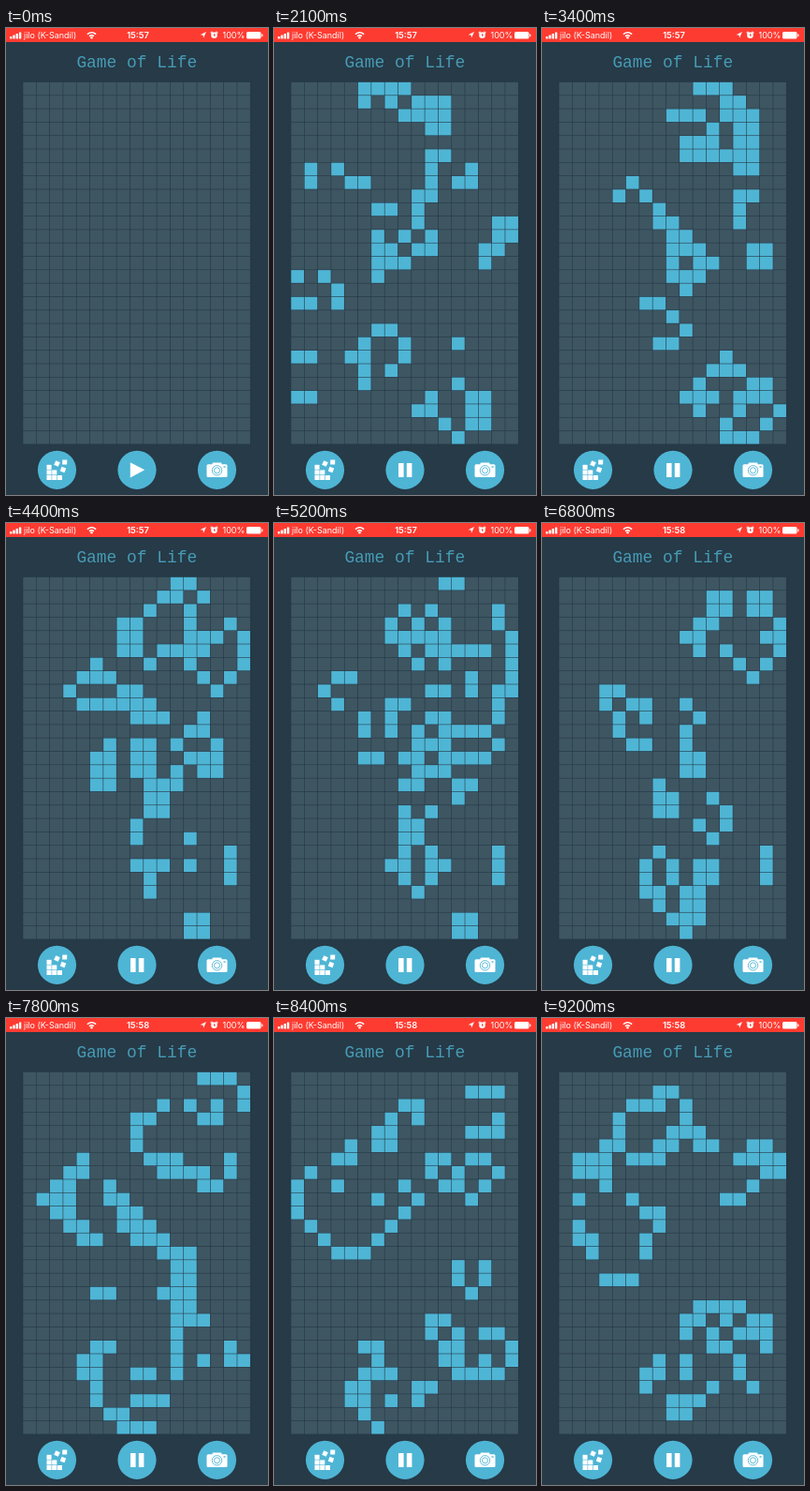
An HTML page with a canvas for the animation above (9300 ms loop, 280 by 498 pixels).

```html
<!DOCTYPE html>
<html lang="en">
<head>
<meta charset="utf-8">
<title>Game of Life</title>
<style>
html, body { margin: 0; width: 280px; height: 498px; overflow: hidden; background: #263a47; }
canvas { display: block; }
</style>
</head>
<body>
<canvas id="stage" width="280" height="498"></canvas>
<script>
const ctx = document.getElementById('stage').getContext('2d');
const LOOP = 9300, STEP = 200, COLS = 17, ROWS = 27;
const LEFT = 18, TOP = 57.5, PITCH = 14.31, GAP = 0.6;
const BACK = '#263a47', BLUE = '#4fb5d5', RED = '#fe3b31', WHITE = '#fff';

const makeGrid = alive => Array.from({ length: ROWS }, (_, r) =>
  Array.from({ length: COLS }, (_, c) => alive(r, c) ? 1 : 0));

// Cells beyond the border count as dead
function evolve(grid) {
  return makeGrid((r, c) => {
    let sum = 0;
    for (let y = r - 1; y <= r + 1; y++)
      for (let x = c - 1; x <= c + 1; x++) sum += grid[y]?.[x] || 0;
    return sum === 3 || (sum === 4 && grid[r][c]);
  });
}

// Brings cells to life along a walk of compass steps
function walk(grid, c, r, steps = '') {
  grid[r][c] = 1;
  for (const step of steps.split(' ')) {
    c += step.includes('E') - step.includes('W');
    r += step.includes('S') - step.includes('N');
    grid[r][c] = 1;
  }
}

function makeStart() {
  const grid = makeGrid(() => false);
  const add = (...args) => walk(grid, ...args);
  add(5, 1, 'N E E E SW SE NE E E S S W N W');
  add(11, 5, 'W S S S W S S SE S W NW SW SE W SW N N N');
  add(15, 10, 'E S SW SW N NE');
  add(7, 21, 'NE N NW W SW SW E S S');
  add(12, 22, 'SE E S S NW S SW NW NW W NE');
  add(1, 6, 'S');
  add(3, 6, 'SE E');
  add(13, 6, 'S W');
  add(6, 9, 'E');
  add(2, 14, 'SE S');
  add(0, 14);
  add(12, 19);
  for (const r of [16, 20, 23]) add(0, r, 'E');
  return grid;
}

let seed = 7;
const random = () => (seed = seed * 16807 % 2147483647) / 2147483647;
const empty = makeGrid(() => false);
const soup = makeGrid(() => random() < 0.2);
const generations = [makeStart()];
for (let t = 2200; t < LOOP; t += STEP) generations.push(evolve(generations.at(-1)));

function gridAt(t) {
  if (t < 1100) return empty;
  if (t < 2100) return soup;
  return generations[Math.floor((t - 2000) / STEP)];
}

function rect(x, y, w, h, color) {
  ctx.fillStyle = color;
  ctx.fillRect(x, y, w, h);
}

function box(x, y, w, h, radius, color) {
  ctx.fillStyle = color;
  ctx.beginPath();
  ctx.roundRect(x, y, w, h, radius);
  ctx.fill();
}

function disc(x, y, radius, color) {
  ctx.fillStyle = color;
  ctx.beginPath();
  ctx.arc(x, y, radius, 0, 7);
  ctx.fill();
}

function ring(x, y, radius, width, color, from = 0, to = 7) {
  ctx.strokeStyle = color;
  ctx.lineWidth = width;
  ctx.beginPath();
  ctx.arc(x, y, radius, from, to);
  ctx.stroke();
}

function poly(points, color) {
  ctx.fillStyle = color;
  ctx.beginPath();
  points.forEach(([x, y]) => ctx.lineTo(x, y));
  ctx.fill();
}

function text(str, x, y, font, color, align = 'left') {
  ctx.font = font;
  ctx.fillStyle = color;
  ctx.textAlign = align;
  ctx.fillText(str, x, y);
}

function tilted(x, y, size, angle) {
  ctx.save();
  ctx.translate(x, y);
  ctx.rotate(angle);
  rect(-size / 2, -size / 2, size, size, WHITE);
  ctx.restore();
}

function drawStatus(t) {
  const sans = 'Inter, sans-serif';
  rect(0, 0, 280, 15, RED);
  for (let i = 0; i < 4; i++) box(4 + i * 3.3, 9 - i * 1.5, 2.4, 2.5 + i * 1.5, 0.5, WHITE);
  text('jilo (K-Sandil)', 19, 11, '9px ' + sans, WHITE);
  for (const radius of [3.2, 6.2]) ring(91.5, 11, radius, 1.6, WHITE, -2.4, -0.75);
  disc(91.5, 10.3, 1.2, WHITE);
  text(t < 6000 ? '15:57' : '15:58', 141, 11, '600 9.3px ' + sans, WHITE, 'center');
  poly([[214, 4], [207.5, 7.3], [210.6, 7.6], [211, 10.8]], WHITE);
  disc(222.5, 7.8, 3.3, WHITE);
  for (const x of [220, 225]) ring(x, 5, 1, 1, WHITE);
  rect(222, 6, 0.9, 2.4, RED);
  rect(222, 7.6, 2, 0.8, RED);
  text('100%', 231.5, 11, '9px ' + sans, WHITE);
  box(257, 4, 15.5, 7.5, 1.5, WHITE);
  box(273.2, 6.3, 1.2, 3, 0.6, WHITE);
}

function drawCells(grid) {
  const size = PITCH - GAP;
  rect(LEFT - GAP / 2, TOP - GAP / 2, COLS * PITCH + GAP, ROWS * PITCH + GAP, '#243946');
  grid.forEach((row, r) => row.forEach((live, c) =>
    rect(LEFT + c * PITCH + GAP / 2, TOP + r * PITCH + GAP / 2, size, size,
      live ? BLUE : '#3e5562')));
}

function drawScatter() {
  for (let r = 0; r < 3; r++)
    for (let c = 0; c < [3, 2, 1][r]; c++)
      rect(43.5 + c * 5.7, 477 - r * 5.6, 5.1, 5, WHITE);
  tilted(54.5, 464.5, 5, 0.45);
  tilted(61, 471, 5, 0.35);
  tilted(62.7, 463, 5, 0.03);
}

function drawCamera() {
  box(214.5, 465.3, 22, 13.8, 1.5, WHITE);
  box(220.5, 463.5, 10, 4, 1, WHITE);
  for (const radius of [5.2, 3]) ring(225.5, 471.8, radius, 0.9, BLUE);
  rect(232.5, 467.3, 2.2, 1.3, BLUE);
}

function drawButtons(running) {
  for (const x of [54.5, 140, 225.5]) disc(x, 471.3, 20.6, BLUE);
  drawScatter();
  if (running) for (const x of [133, 141.8]) box(x, 464, 5.6, 15, 0.5, WHITE);
  else poly([[132.8, 463.2], [148.2, 471.3], [132.8, 479.5]], WHITE);
  drawCamera();
}

function draw(t) {
  rect(0, 0, 280, 498, BACK);
  drawStatus(t);
  text('Game of Life', 139.8, 41.5, '17.9px "Liberation Mono", monospace', '#479bb5', 'center');
  drawCells(gridAt(t));
  drawButtons(t >= 1800);
}

const begin = performance.now();
function frame() {
  draw((performance.now() - begin) % LOOP);
  requestAnimationFrame(frame);
}
frame();
</script>
</body>
</html>
```
